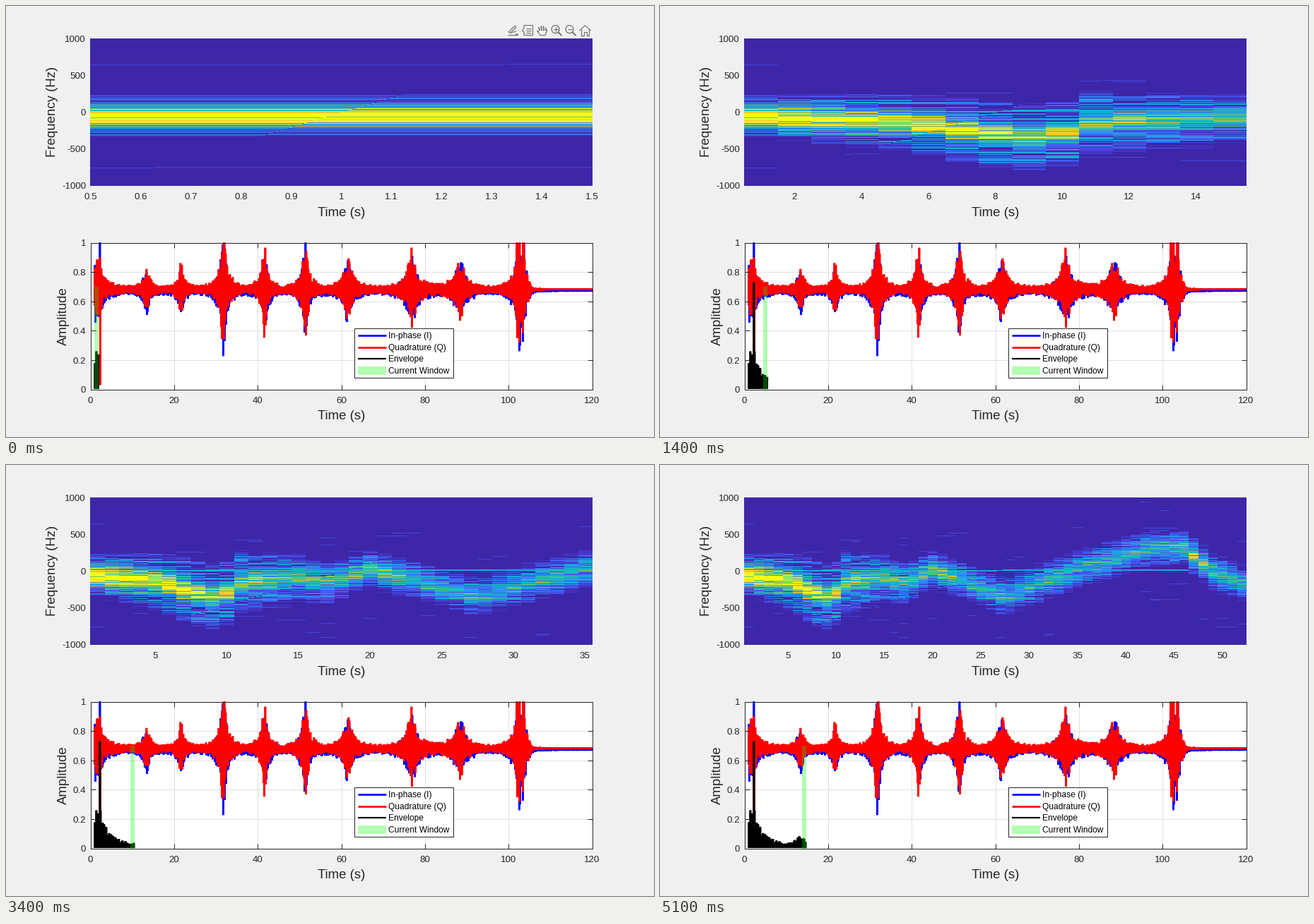
A matplotlib script that plays this animation: 917 px wide and 611 px high, repeating every 5200 ms.

```python
import numpy as np
import matplotlib.pyplot as plt
from matplotlib.animation import FuncAnimation
from matplotlib.colors import LinearSegmentedColormap
from matplotlib.patches import Circle, Rectangle

W, H, DPI = 917, 611, 64
PX = 72 / DPI                      # points per pixel
FRAMES, INTERVAL = 52, 100
ROWS, COLS = 209, 711              # spectrogram size in pixels
SPEC_TOP = 46
LEFT, RIGHT = 119.5, 829.5
TOP, BOTTOM = 335.5, 543.5
INK, GRAY, GRID = "#262626", "#737373", "#dfdfdf"
SAMPLE = .5 * 120 / (RIGHT - LEFT)  # seconds per half pixel

plt.rcParams["font.family"] = "Liberation Sans"
rng = np.random.default_rng(7)

parula = LinearSegmentedColormap.from_list("parula", [
    "#3e26a8", "#4758f8", "#2896eb", "#0eb5c9",
    "#48cb86", "#c8c129", "#fec634", "#f9fb14"])


def time_x(t):
    return LEFT + np.asarray(t) * (RIGHT - LEFT) / 120


def amp_y(a):
    return BOTTOM - np.asarray(a) * (BOTTOM - TOP)


def bump(x, center, width):
    return np.exp(-((x - center) / width) ** 2)


# ---------- spectrogram ----------
# (column, height) points the bright band drifts through
DRIFT = [(1, 157), (5, 164), (9.5, 190), (11, 165), (15, 160), (17, 168), (20, 148),
         (27.5, 188), (35, 148), (43, 117), (46, 118), (49, 152), (52, 168)]


def make_spectrum():
    y = np.arange(ROWS) + SPEC_TOP
    spec = np.zeros((ROWS, FRAMES))
    noise = rng.random((3, ROWS))
    for k in range(1, FRAMES + 1):
        # neighbouring columns share part of their lines
        fresh = rng.random((3, ROWS))
        noise = np.where(rng.random((3, ROWS)) < .4, noise, fresh)
        center = np.interp(k, *zip(*DRIFT))
        power = (.36 + bump(k, 0, 10) + .2 * bump(k, 20.5, 2)
                 + .25 * bump(k, 47.5, 2))
        reach = 30 + 20 * bump(k, 9, 6)
        offset = y - center
        main = power * bump(offset, 0, 12) * (.3 + .95 * noise[0])
        edge = np.clip((reach - np.abs(offset)) / 14, 0, 1)
        haze = (.18 + .14 * np.exp(-k / 20)) * edge * np.clip(2.2 * noise[1] - .6, 0, None)
        stray = .09 * ((noise[2] > .988) & (np.abs(offset) < 80))
        col = main + haze + stray
        col[col < .045] = 0
        if 6 <= k <= 46:           # steady line at 0 Hz
            zero = slice(ROWS // 2 - 1, ROWS // 2 + 1)
            col[zero] = np.maximum(col[zero], rng.uniform(.3, .45))
        spec[:, k - 1] = col
    return np.clip(spec, 0, 1)


spectrum = make_spectrum()
shifted = np.roll(spectrum, -1, axis=0)
px, py = np.meshgrid(np.arange(COLS), np.arange(ROWS))
above_diagonal = py < ROWS * (1 - px / COLS)


def spectrum_image(n):
    """First n columns spread over the full width, split along the diagonal."""
    cols = np.arange(COLS) * n // COLS
    return np.where(above_diagonal, spectrum[:, cols], shifted[:, cols])


# ---------- signals ----------
# center (s), height, width (s)
BURSTS = [(1.6, .22, 2), (13.4, .14, 1.4), (21.7, .16, 1.2), (31.8, .4, 1.3),
          (41.6, .33, 1.1), (51.4, .34, 1.2), (61.6, .21, 1.8), (76.8, .24, 2.1),
          (88.4, .19, 2.3), (102.4, .36, 1.3), (103.6, .24, .6)]


def burst_size(t):
    size = np.where(t < 105, .016, .003 + .008 * np.exp(-(t - 105) / 4))
    for center, height, width in BURSTS:
        d = np.abs(t - center)
        size = size + height * (.45 * bump(d, 0, .5 * width)
                                + .55 * np.exp(-d / (1.3 * width)))
    return np.where(t > 104.5, np.minimum(size, .008 + .12 * np.exp(-(t - 104.5) / .6)), size)


def make_wave(base, spike):
    t = np.arange(1, 120, SAMPLE)
    sign = np.where(np.arange(t.size) % 2, 1, -1)
    wave = base + sign * burst_size(t) * (.55 + .55 * rng.random(t.size) ** 2)
    i = np.searchsorted(t, 2.25)
    wave[i:i + 2] = spike
    return time_x(t), amp_y(np.clip(wave, 0, 1))


def make_envelope():
    t = np.arange(1, 15, SAMPLE)
    decay = np.where(t < 2.6, .26, .19 * np.exp(-(t - 2.6) / 3))
    peak = decay + .02 + .12 * np.exp(-np.abs(t - 13.3) / .9)
    env = np.where(np.arange(t.size) % 2, peak * (.5 + .5 * rng.random(t.size)), .003)
    env[np.searchsorted(t, 2.25)] = .73
    return t, env


env_t, env_v = make_envelope()

# ---------- stage ----------
fig = plt.figure(figsize=(W / DPI, H / DPI), dpi=DPI, facecolor="#f0f0f0")
ax = fig.add_axes([0, 0, 1, 1])
ax.axis("off")


def text(x, y, s, size=13.33, ha="center", color=INK, **kw):
    return ax.text(x, y, s, fontsize=size * PX, ha=ha, va="baseline",
                   color=color, zorder=9, **kw)


def axis_title(x, y, s, rotation=0):
    text(x, y, s, 18.67, rotation=rotation, rotation_mode="anchor")


def line(x, y, color=INK, width=1, z=5):
    return ax.plot(x, y, color=color, lw=width * PX, zorder=z,
                   solid_joinstyle="bevel", solid_capstyle="butt")[0]


def box(x0, y0, x1, y1, z, **kw):
    return ax.add_patch(Rectangle((x0, y0), x1 - x0, y1 - y0, zorder=z, lw=PX, **kw))


image = ax.imshow(spectrum_image(1), cmap=parula, vmin=0, vmax=1, aspect="auto",
                  extent=(119, 830, SPEC_TOP + ROWS, SPEC_TOP),
                  interpolation="nearest")
for i in range(5):
    text(113, 51 + i * 52.1, str(1000 - 500 * i), ha="right")
axis_title(474.5, 297.5, "Time (s)")
axis_title(70.5, 150, "Frequency (Hz)", 90)

box(LEFT, TOP, RIGHT, BOTTOM, 1, fc="white", ec="none")
for t in range(0, 121, 20):
    x = float(time_x(t))
    line([x, x], [TOP, BOTTOM], GRID, z=2)
    line([x, x], [TOP, TOP + 7])
    line([x, x], [BOTTOM - 7, BOTTOM])
    text(x, 563, str(t))
for i in range(6):
    y = float(amp_y(i / 5))
    line([LEFT, RIGHT], [y, y], GRID, z=2)
    line([LEFT, LEFT + 7], [y, y])
    line([RIGHT - 7, RIGHT], [y, y])
    text(113, y + 5, f"{i / 5:g}", ha="right")
box(LEFT, TOP, RIGHT, BOTTOM, 5, fc="none", ec=INK)
axis_title(474.5, 586.5, "Time (s)")
axis_title(85.5, 439.5, "Amplitude", 90)

line(*make_wave(.671, (1, .6)), color="blue", width=2.67, z=3)
line(*make_wave(.682, (.9, .03)), color="red", width=2.67, z=3.1)
envelope = line([], [], "black", 2.67, z=3.2)
window = box(0, amp_y(.7), 1, BOTTOM, 4, fc=(0, 1, 0, .3), ec="none")

box(492.5, 456.5, 632.5, 526.5, 6, fc="white", ec=INK)
legend = [("In-phase (I)", "blue", 2.67), ("Quadrature (Q)", "red", 2.67),
          ("Envelope", "black", 2.2), ("Current Window", "#b3ffb3", 12)]
for i, (name, color, width) in enumerate(legend):
    y = 467 + 16.6 * i
    line([497.5, 537.5], [y, y], color, width, z=7)
    text(541, y + 4.2, name, 12, ha="left", color="black")


# ---------- toolbar ----------
def stroke(*points, width=1.2):
    return line(*zip(*points), color=GRAY, width=width)


def magnifier(x):
    ring = ax.add_patch(Circle((x, 33), 5.5, fc="none", ec=GRAY, lw=1.3 * PX))
    return [ring, stroke((x + 4, 37), (x + 9, 42), width=2),
            stroke((x - 3, 33), (x + 3, 33))]


def brush():
    return [stroke((710, 40.5), (721, 40.5)),
            stroke((711, 37), (720, 28), (722, 30), (714, 38), (711, 37)),
            stroke((714, 38), (722, 36)),
            stroke((721, 40), (725, 40), (723, 42), (721, 40))]


def data_tip():
    frame = stroke((733, 32), (733, 27.5), (745.5, 27.5), (745.5, 41.5),
                   (733, 41.5), (733, 37), (730.5, 34.5), (733, 32))
    return [frame] + [stroke((736, y), (743, y)) for y in (31.5, 34.5, 37.5)]


def hand():
    palm = stroke((754, 36), (751.5, 35), (756, 41.5), (763, 41.5), (766, 33))
    fingers = [stroke((755 + 3 * i, 35), (754 + 3.2 * i, 28 + (i - 1.4) ** 2), width=1.8)
               for i in range(4)]
    return [palm] + fingers


def house():
    return [stroke((811.5, 35), (819.5, 27.5), (827.5, 35)),
            stroke((814, 33), (814, 41.5), (817.5, 41.5), (817.5, 36.5),
                   (821.5, 36.5), (821.5, 41.5), (825, 41.5), (825, 33))]


tools = [*brush(), *data_tip(), *hand(), *magnifier(777.5),
         stroke((777.5, 30), (777.5, 36)), *magnifier(797.5), *house()]

tick_labels = [text(0, 274, "") for _ in range(12)]
ax.set_xlim(0, W)
ax.set_ylim(H, 0)


def update(i):
    n = i + 1
    image.set_data(spectrum_image(n))

    step = next(s for s in (.1, .2, .5, 1, 2, 5) if n / s <= 11)
    ticks = np.arange(np.ceil(.5 / step - 1e-9), (n + .5) / step + 1e-9) * step
    for j, label in enumerate(tick_labels):
        shown = j < len(ticks)
        label.set_visible(shown)
        if shown:
            label.set_x(LEFT + (ticks[j] - .5) / n * (RIGHT - LEFT))
            label.set_text(f"{ticks[j]:g}")

    start = 1 + .25 * i
    drawn = env_t <= start + 1
    envelope.set_data(time_x(env_t[drawn]), amp_y(env_v[drawn]))
    window.set_x(time_x(start))
    window.set_width(time_x(1) - LEFT)

    for tool in tools:
        tool.set_visible(i == 0)


anim = FuncAnimation(fig, update, frames=FRAMES, interval=INTERVAL,
                     repeat=True, repeat_delay=0)
plt.show()
```
